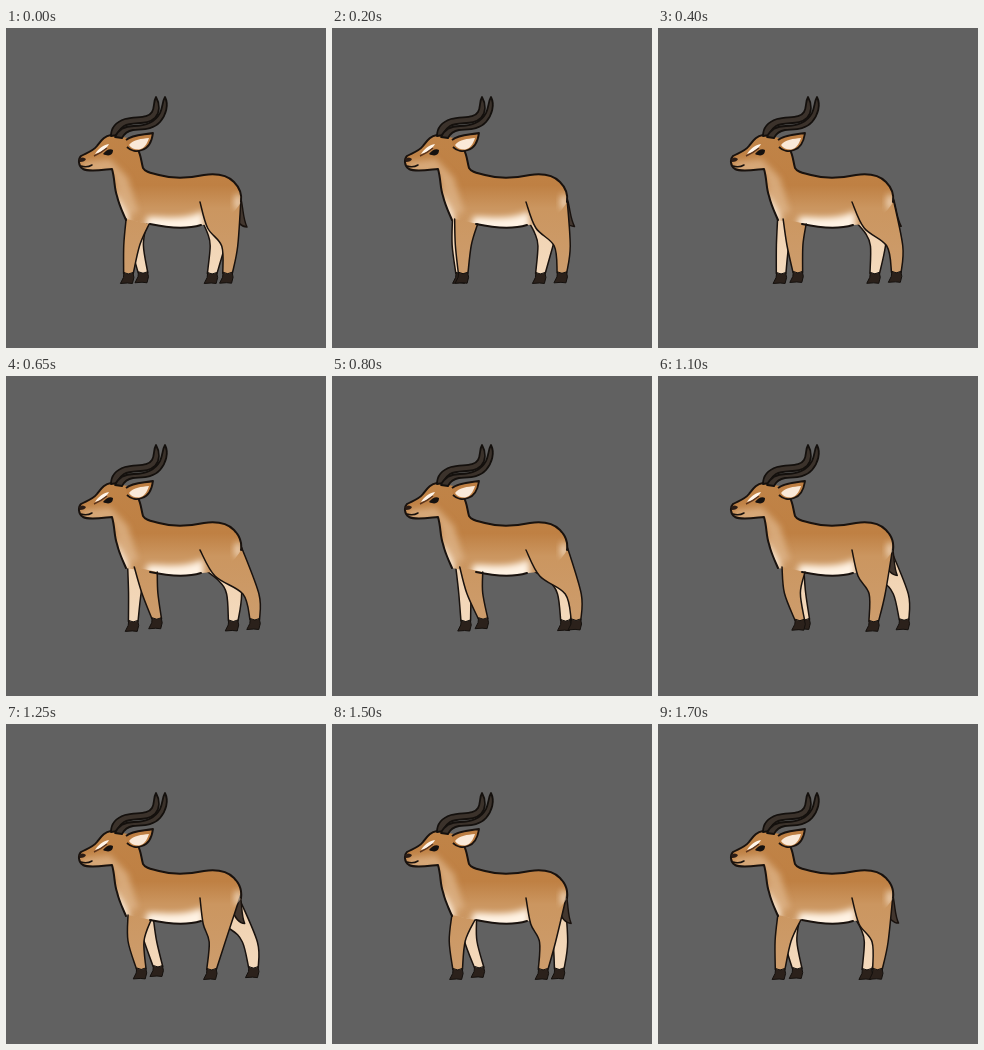
Write an HTML page that moves like this. It is 320 by 320 pixels and loops after 1750 ms.

```html
<!DOCTYPE html>
<html lang="en">
<head>
<meta charset="utf-8">
<title>Walking antelope</title>
<style>
  html, body { margin: 0; width: 100%; height: 100%; overflow: hidden; background: #616161; }
  svg { display: block; width: 100%; height: 100%; }
  .line { fill: none; stroke: #19120e; stroke-width: 2; stroke-linecap: round; stroke-linejoin: round; }
  .thin { stroke-width: 1.5; }
  .horn { fill: #3b322b; stroke: #14100d; stroke-width: 1.8; stroke-linejoin: round; }
  .hoof { fill: #2b211b; stroke: #14100d; stroke-width: 1; stroke-linejoin: round; }
  .soft { filter: url(#blur); }
</style>
</head>
<body>
<svg viewBox="0 0 320 320">
  <defs>
    <linearGradient id="coat" gradientUnits="userSpaceOnUse" x1="0" y1="105" x2="0" y2="250">
      <stop offset="0" stop-color="#c08448"/>
      <stop offset=".36" stop-color="#bf8043"/>
      <stop offset=".52" stop-color="#cb9660"/>
      <stop offset="1" stop-color="#cd9d6d"/>
    </linearGradient>
    <linearGradient id="cream" gradientUnits="userSpaceOnUse" x1="0" y1="190" x2="0" y2="250">
      <stop offset="0" stop-color="#f0d2b1"/>
      <stop offset="1" stop-color="#f4dabd"/>
    </linearGradient>
    <filter id="blur" x="-50%" y="-50%" width="200%" height="200%"><feGaussianBlur stdDeviation="3"/></filter>
    <path id="torso" d="M105 107C98 108 95 113 91 118C86 124 80 125 75 128C72 131 72 138 77 141C83 144 95 142 106 141
      C109 151 108 160 111 168C113 177 117 185 120 192L144 196C158 199 178 202 195 197C212 196 226 190 235 174
      C236 167 234 160 228 154C221 147 212 145 198 147C184 150 167 151 153 147C146 145 140 145 137 140
      C135 133 135 127 132 122L122 110Z"/>
    <clipPath id="inside"><use href="#torso"/></clipPath>
  </defs>
  <rect width="320" height="320" fill="#616161"/>
  <g id="far"></g>
  <path id="tail" fill="#43372f" stroke="#19120e" stroke-width="1.4" stroke-linejoin="round"
    d="M230 160C235 165 236 175 237 183C238 190 239 195 241 199C236 199 230 194 229 187C228 180 231 172 230 160Z"/>
  <use href="#torso" fill="url(#coat)"/>
  <g clip-path="url(#inside)">
    <path class="soft" fill="#dfb68b" opacity=".75" d="M74 134L104 131L122 150L132 184L116 190L106 144L78 146Z"/>
    <path class="soft" fill="#fff3e4" d="M141 189C152 188 178 193 197 183L198 205H139Z"/>
    <path class="soft" fill="#fff0df" d="M106 160C112 171 119 178 124 194L114 195Z"/>
  </g>
  <g id="near"></g>
  <g clip-path="url(#inside)"><ellipse class="soft" cx="232" cy="174" rx="4" ry="8" fill="#f8e4cd" opacity=".75"/></g>
  <path class="line" d="M105 107C98 108 95 113 91 118C86 124 80 125 75 128C72 131 72 138 77 141C83 144 95 142 106 141
    C109 151 108 160 111 168C113 177 117 185 120 192"/>
  <path class="line" d="M144 196C158 199 178 202 195 197"/>
  <path class="line" d="M132 122C135 127 135 133 137 140C140 145 146 145 153 147C167 151 184 150 198 147
    C212 145 221 147 228 154C234 160 236 167 235 174"/>
  <path class="horn" d="M105 108C105 100 110 94 119 91C130 88 142 91 146 84C149 79 147 74 150 69C154 76 154 84 149 90C141 98 127 93 118 98C114 101 112 104 112 107Z"/>
  <path class="horn" d="M109 109C112 102 119 98 128 98C140 98 149 94 154 85C157 79 156 74 159 69C163 77 160 87 154 94C147 102 136 101 127 102C121 103 118 106 116 110Z"/>
  <path fill="#bd7e42" stroke="#19120e" stroke-width="1.8" stroke-linejoin="round" d="M120 112C127 106 138 107 147 105C146 112 143 120 136 122C131 124 125 123 121 119"/>
  <path fill="#fae9d8" d="M123 117C128 111 135 111 143 110C141 116 138 121 133 121.500C128 121.500 125 120 123 117Z"/>
  <path fill="#fff5ea" d="M89 126C92 121 97 117 103 116C101 120 96 124 89 126Z"/>
  <path fill="none" stroke="#5c351d" stroke-width="1.500" d="M88 128Q95 125 101 120"/>
  <path fill="#15110f" d="M97 126C100 122 104 120 107 122C107 127 103 129 97 126Z"/>
  <path fill="#2b1c15" d="M73 131Q77 128 80 131Q79 134 74 134Z"/>
  <path class="line thin" d="M75 138Q81 140 86 137"/>
</svg>
<script>
const LOOP = 1750, STEP = 50;
const ANKLE = 4.8, ANKLE_Y = 245.5;

// reach: ankle x from front to back; stance: time spent going back;
// knee follows the ankle from x = from by the factor follow.
const FRONT = { reach: [122, 152], stance: 690, from: 125.5, follow: .64, kneeY: 217, bend: 4, lift: 3 };
const HIND = { reach: [204, 249], stance: 1075, from: 210, follow: .78, kneeY: 218, bend: 0, lift: 2 };

// thigh: how far the upper front edge follows the knee, and its height.
const LEGS = [
  { ...HIND, layer: 'far', start: 95, front: [195, 191], back: [233, 174], width: 7.5, thigh: [.7, 205] },
  { ...FRONT, layer: 'far', start: 530, front: [120, 191], back: [138, 195], width: 6.3, lean: .5 },
  { ...HIND, layer: 'near', start: 1330, front: [194, 174], back: [235, 170], width: 8, thigh: [.35, 200] },
  { ...FRONT, layer: 'near', start: 1740, front: [120, 191], back: [143, 196], width: 8, lean: .45 },
];

function spline(points, start = 'M') {
  let d = start + points[0];
  for (let i = 0; i < points.length - 1; i++) {
    const a = points[i], b = points[i + 1];
    const before = points[i - 1] || a, after = points[i + 2] || b;
    const c1 = a.map((p, k) => p + (b[k] - before[k]) / 6);
    const c2 = b.map((p, k) => p - (after[k] - a[k]) / 6);
    d += `C${c1} ${c2} ${b}`;
  }
  return d;
}

function addPath(parent, attributes) {
  const path = document.createElementNS('http://www.w3.org/2000/svg', 'path');
  for (const name in attributes) path.setAttribute(name, attributes[name]);
  return parent.appendChild(path);
}

for (const leg of LEGS) {
  const layer = document.getElementById(leg.layer);
  leg.fill = addPath(layer, { fill: leg.layer === 'far' ? 'url(#cream)' : 'url(#coat)' });
  leg.edge = addPath(layer, { class: 'line thin' });
  leg.hoof = addPath(layer, { class: 'hoof', d: 'M-4.500 -1Q0 2 4.500 -1L5.500 4L4 10L-1 9.500L-8 10L-5 4Z' });
}

// Steady push backwards, eased swing forwards.
function pose(leg, t) {
  const phase = (t - leg.start + LOOP) % LOOP;
  const swing = Math.max(0, (phase - leg.stance) / (LOOP - leg.stance));
  const back = swing ? (1 + Math.cos(Math.PI * swing)) / 2 : phase / leg.stance;
  const [near, far] = leg.reach;
  const x = near + (far - near) * back;
  return {
    ankle: [x, ANKLE_Y - leg.lift * back * back],
    knee: [leg.from + leg.follow * (x - near) - leg.bend * Math.sin(Math.PI * swing), leg.kneeY],
  };
}

function drawLeg(leg, t) {
  const { ankle, knee } = pose(leg, t);
  const shift = (leg.lean || 0) * (knee[0] - leg.from);
  const side = (hip, sign) => [
    [hip[0] + shift, hip[1]],
    [knee[0] + sign * leg.width, knee[1]],
    [ankle[0] + sign * ANKLE, ankle[1]],
  ];
  const front = side(leg.front, -1), back = side(leg.back, 1);
  if (leg.thigh) {
    const [follow, y] = leg.thigh, hipX = front[0][0];
    front.splice(1, 0, [hipX + follow * (front[1][0] - hipX), y]);
  }
  leg.fill.setAttribute('d', spline(front) + spline([...back].reverse(), 'L') + 'Z');
  leg.edge.setAttribute('d', spline(front) + spline(back));
  leg.hoof.setAttribute('transform', `translate(${ankle})`);
}

const tail = document.getElementById('tail');
const begin = performance.now();
function draw() {
  const t = Math.floor(((performance.now() - begin) % LOOP) / STEP) * STEP;
  LEGS.forEach(leg => drawLeg(leg, t));
  tail.setAttribute('transform', `rotate(${-3.5 * Math.sin(2 * Math.PI * t / LOOP)} 230 161)`);
  requestAnimationFrame(draw);
}
draw();
</script>
</body>
</html>
```
